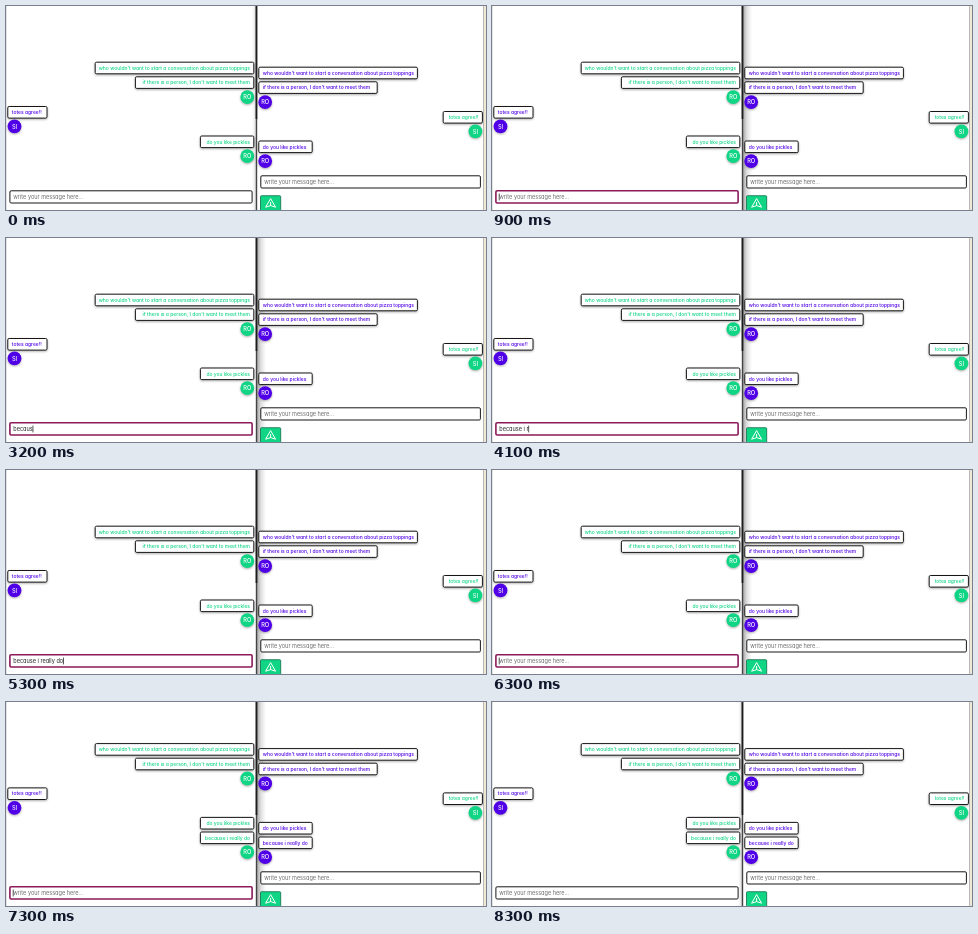
Recreate the animation shown at these times as an HTML page. Size 480 by 204 pixels, loop 8400 ms.

```html
<!DOCTYPE html>
<html lang="en">
<head>
<meta charset="utf-8">
<title>Chat in two windows</title>
<style>
  html, body { margin: 0; width: 100%; height: 100%; overflow: hidden; background: #fff; }
  svg { display: block; width: 480px; height: 204px; }
  text { font: 500 4.97px Inter, "Open Sans", sans-serif; font-feature-settings: "cv11"; white-space: pre; }
  .avatar { font-size: 5.7px; fill: #fff; text-anchor: middle; }
  .field { font-size: 5.55px; font-weight: 400; fill: #222; }
  .hint { fill: #6c6c6c; }
  .box { fill: #fff; stroke: #161616; }
  .shade { filter: drop-shadow(.7px 1.6px 1.3px rgba(0, 0, 0, .32)); }
</style>
</head>
<body>
<svg id="stage" viewBox="0 0 480 204">
  <defs>
    <linearGradient id="cast">
      <stop offset="0" stop-color="#000" stop-opacity=".34"/>
      <stop offset=".45" stop-color="#000" stop-opacity=".12"/>
      <stop offset="1" stop-color="#000" stop-opacity="0"/>
    </linearGradient>
  </defs>
</svg>
<script>
const LOOP = 8400, FOCUS = 600, SEND = 6200, RIGHT_MOVE = 6500, LEFT_MOVE = 6600, BLUR = 8200;
const GREEN = '#0fd585', PURPLE = '#5000e6', ROW = 14.6;
const HINT = 'write your message here...', TYPED = 'because i really do';
const KEYS = [2100, 2200, 2600, 2700, 3100, 3200, 3300, 3600, 3800, 3900,
  4100, 4200, 4300, 4400, 4500, 4600, 4700, 4900, 5200];

const stage = document.getElementById('stage');

function add(parent, tag, attrs, content) {
  const el = document.createElementNS('http://www.w3.org/2000/svg', tag);
  for (const key in attrs) el.setAttribute(key, attrs[key]);
  if (content) el.textContent = content;
  parent.append(el);
  return el;
}

const show = (el, on) => el.setAttribute('visibility', on ? 'visible' : 'hidden');

function bubble(parent, side, edge, y, w, text) {
  const mine = side === 'end';
  const g = add(parent, 'g', {});
  add(g, 'rect', { class: 'box shade', x: mine ? edge - w : edge, y, width: w, height: 11.6, rx: 1.3, 'stroke-width': 1 });
  add(g, 'text', { x: edge + (mine ? -3.8 : 4), y: y + 7.6, 'text-anchor': side, fill: mine ? GREEN : PURPLE }, text);
  return g;
}

function avatar(parent, x, y, color, text) {
  add(parent, 'circle', { class: 'shade', cx: x, cy: y, r: 6.9, fill: color });
  add(parent, 'text', { class: 'avatar', x, y: y + 2.1 }, text);
}

// One side of the chat: everything but the last avatar scrolls up by a row.
function chat(top, ro, si) {
  const g = add(stage, 'g', {});
  const roColor = ro.side === 'end' ? GREEN : PURPLE;
  const siColor = si.side === 'end' ? GREEN : PURPLE;
  const say = (parent, who, y, w, text) => bubble(parent, who.side, who.edge, top + y, w, text);
  const log = add(g, 'g', {});
  say(log, ro, 0, 158.6, "who wouldn't want to start a conversation about pizza toppings");
  say(log, ro, ROW, 118.4, "if there is a person, I don't want to meet them");
  avatar(log, ro.face, top + 34.9, roColor, 'RO');
  say(log, si, 44.3, 39.2, 'totes agree!!');
  avatar(log, si.face, top + 64.2, siColor, 'SI');
  say(log, ro, 73.8, 53.4, 'do you like pickles');
  const reply = say(g, ro, 73.8, 53.4, TYPED);
  avatar(g, ro.face, top + 93.9, roColor, 'RO');
  return moved => {
    log.setAttribute('transform', `translate(0 ${moved ? -ROW : 0})`);
    show(reply, moved);
  };
}

function field(x, y, w) {
  const box = add(stage, 'rect', { class: 'box', x, y, width: w, height: 12.2, rx: 1.2, 'stroke-width': 1 });
  const text = add(stage, 'text', { class: 'field hint', x: x + 3.4, y: y + 8.2 }, HINT);
  return { box, text };
}

const moveLeft = chat(56.2, { side: 'end', edge: 247.8, face: 241.3 }, { side: 'start', edge: 1.8, face: 8.5 });
const { box, text } = field(3.9, 184.8, 242.2);
const caret = add(stage, 'rect', { y: 187.6, width: .7, height: 6.8, fill: '#111' });

const castRight = add(stage, 'rect', { x: 251, y: 0, width: 9, height: 204, fill: 'url(#cast)' });
const castLeft = add(stage, 'rect', { x: -250, y: 0, width: 4, height: 204, fill: 'url(#cast)', transform: 'scale(-1 1)', opacity: .5 });
const moveRight = chat(61.2, { side: 'start', edge: 252.8, face: 259.2 }, { side: 'end', edge: 476.4, face: 469.4 });
field(254.8, 169.8, 219.6);

// Send button
add(stage, 'rect', { x: 254.5, y: 189.7, width: 20.2, height: 15, rx: 1, fill: GREEN, stroke: '#126b4a', 'stroke-width': .8 });
add(stage, 'path', { d: 'M264.6 192.6L269.6 201.2L264.6 199.6L259.6 201.2ZM264.6 199.6V196', fill: 'none', stroke: '#fff', 'stroke-width': 1, 'stroke-linejoin': 'round' });

// Window edges
add(stage, 'rect', { x: 249.8, y: 0, width: 1.4, height: 204, fill: '#444' });
add(stage, 'rect', { x: 249.6, y: 0, width: 1.7, height: 113, fill: '#1c1c1c' });
add(stage, 'rect', { x: 0, y: 0, width: .5, height: 204, fill: '#c8c8c8' });
add(stage, 'rect', { x: 477.4, y: 0, width: .8, height: 204, fill: '#8d8b86' });
add(stage, 'rect', { x: 478.2, y: 0, width: 1.8, height: 204, fill: '#eee8d4' });

function draw(t) {
  const focused = t >= FOCUS && t < BLUR;
  const typed = t < SEND ? KEYS.filter(k => k <= t).length : 0;
  const value = TYPED.slice(0, typed);
  const lastEdit = t >= SEND ? SEND : typed ? KEYS[typed - 1] : FOCUS;

  text.textContent = value || HINT;
  text.classList.toggle('hint', !value);
  box.style.stroke = focused ? '#8c1a5b' : '';
  box.style.strokeWidth = focused ? 1.6 : '';

  const caretX = 7.2 + (value ? text.getComputedTextLength() : -.4);
  caret.setAttribute('x', caretX);
  show(caret, focused && (t - lastEdit) % 1000 < 500);

  show(castRight, focused);
  show(castLeft, !focused);
  moveRight(t >= RIGHT_MOVE);
  moveLeft(t >= LEFT_MOVE);
}

function tick() {
  draw(performance.now() % LOOP);
  requestAnimationFrame(tick);
}
tick();
</script>
</body>
</html>
```
